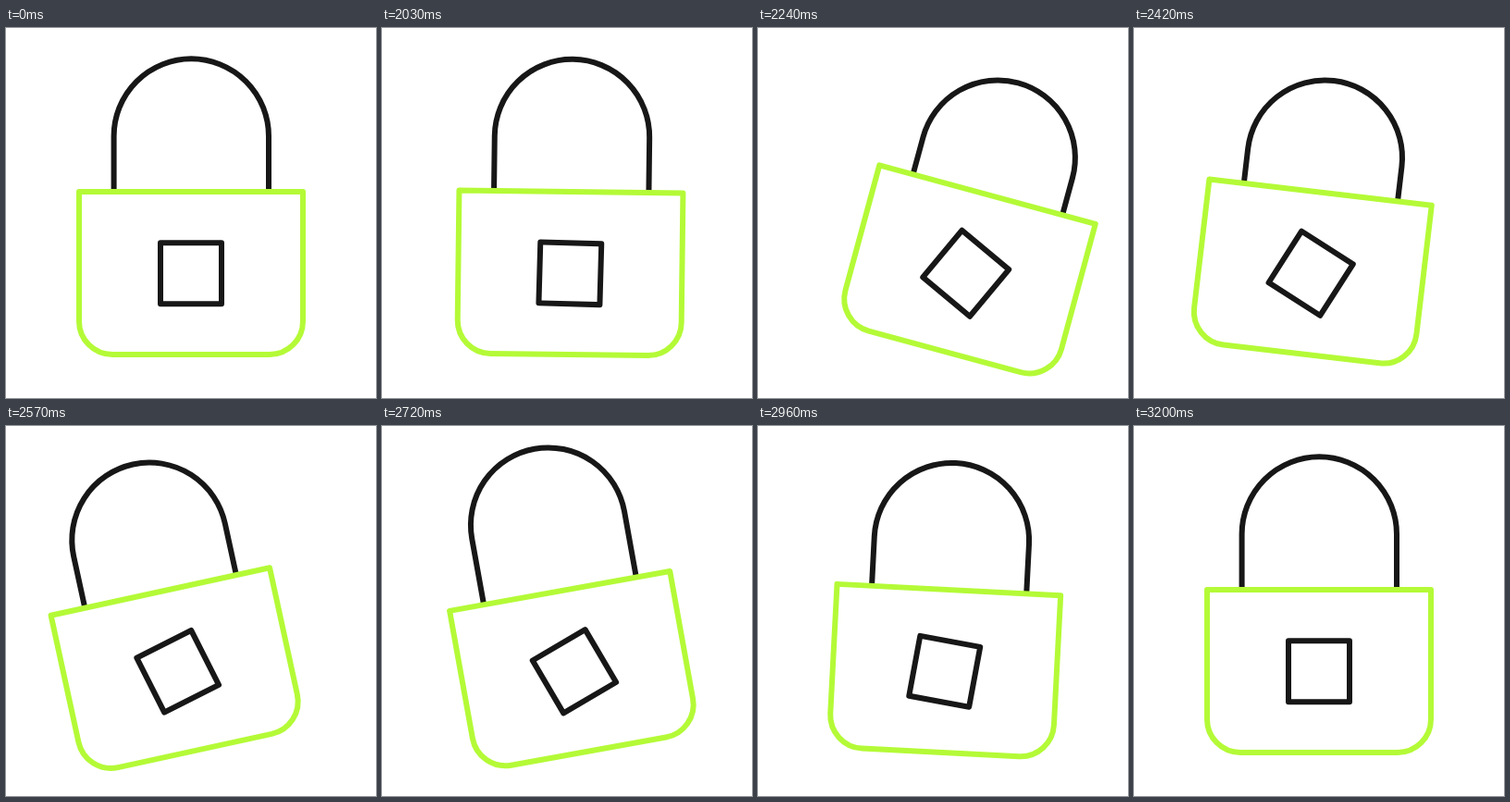
Animation of 400 by 400 pixels, one loop 3230 ms. Source, as an HTML page:

```html
<!DOCTYPE html>
<html lang="en">
<head>
<meta charset="utf-8">
<title>Padlock wobble</title>
<style>
  html, body { margin: 0; height: 100%; overflow: hidden; background: #fff; }
  svg { display: block; width: 100%; height: 100%; }
  path, rect { fill: none; stroke: #171717; stroke-width: 6; stroke-linejoin: round; stroke-linecap: round; }
  #body { fill: #fff; stroke: #b4fa37; }
</style>
</head>
<body>
<svg viewBox="0 0 400 400">
  <g id="lock">
    <path id="shackle" d="M-83.7-50V-148a83.7 83.7 0 0 1 167.4 0V-50"/>
    <path id="body" d="M-121-88H121V52a36 36 0 0 1-36 36H-85a36 36 0 0 1-36-36Z"/>
  </g>
  <rect id="keyhole" x="-33" y="-32.7" width="66" height="66"/>
</svg>
<script>
const LOOP = 3230, START = 2030, STEP = 30;

// [time, value] turning points; each part lags a little behind the slide
const slide = [[1975, 0], [2210, 26], [2512, -18], [2760, 9.5], [3040, 0]];
const tilt = [[1990, 0], [2290, 16.3], [2640, -15.3], [2875, 4.3], [3100, 0]];
const spin = [[1990, 0], [2333, 48], [2650, -40], [2900, 12.5], [3130, 0]];
const sink = [[1995, 0], [2360, 24.5], [2742, -12.7], [2940, 6.5], [3180, 0]];

function swing(keys, t) {
  const i = keys.findIndex(([time]) => time > t);
  if (i < 1) return 0;
  const [t0, v0] = keys[i - 1], [t1, v1] = keys[i];
  return v0 + (v1 - v0) * (1 - Math.cos(Math.PI * (t - t0) / (t1 - t0))) / 2;
}

const place = (id, x, y, angle = 0) =>
  document.getElementById(id).setAttribute('transform', `translate(${x} ${y}) rotate(${angle})`);

function draw(now) {
  const time = now % LOOP;
  const t = time < START ? 0 : START + Math.floor((time - START) / STEP) * STEP;
  const x = 200 + swing(slide, t);
  place('lock', x, 265, swing(tilt, t));
  place('shackle', 0.3, swing(sink, t));
  place('keyhole', x, 265, swing(spin, t));
}

const begin = performance.now();
function tick() {
  draw(performance.now() - begin);
  requestAnimationFrame(tick);
}
tick();
</script>
</body>
</html>
```
